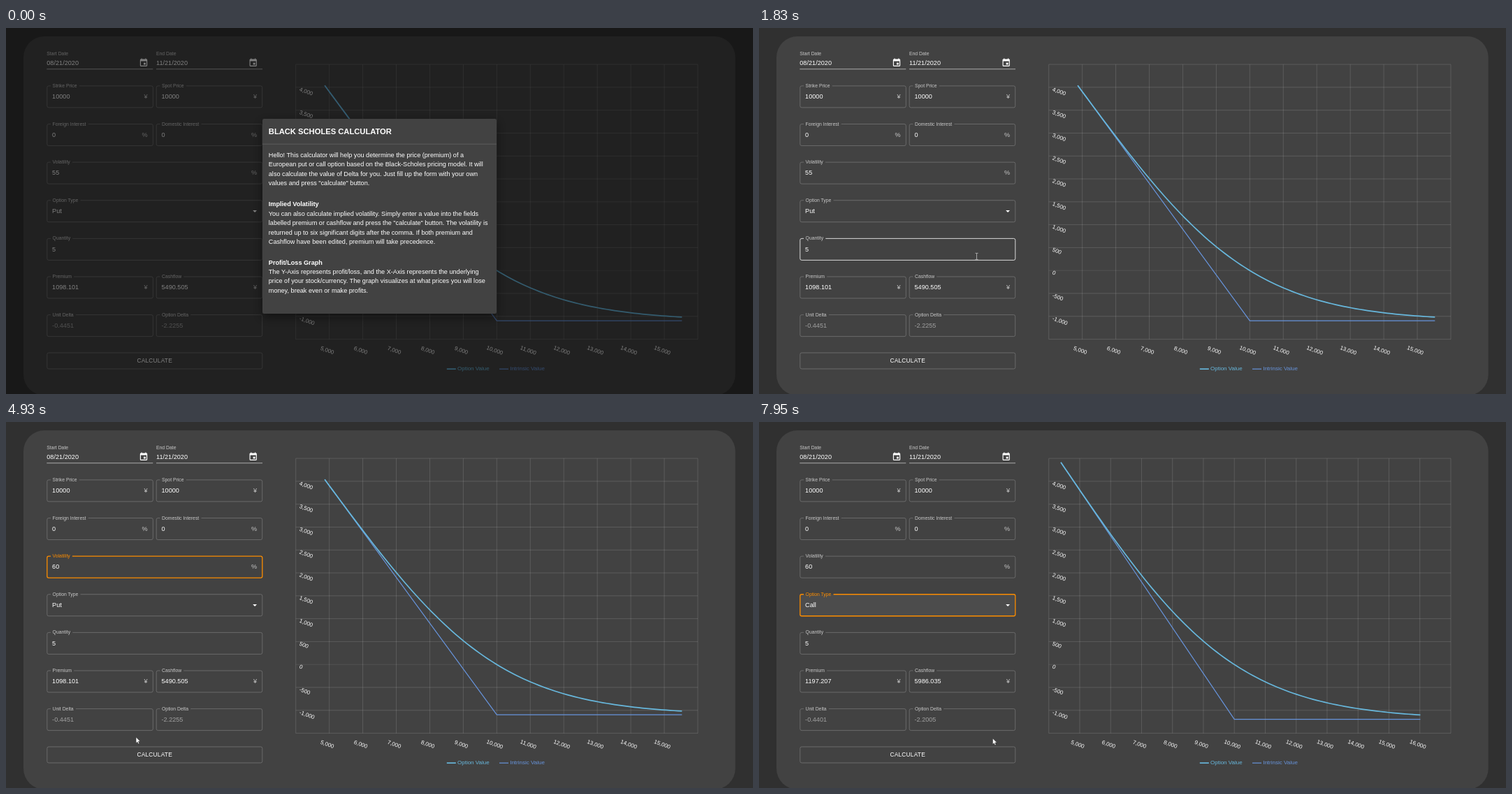
These frames come from a looping animation (1069x524 px, 8000 ms). An HTML page:

```html
<!DOCTYPE html>
<html lang="en">
<head>
<meta charset="utf-8">
<title>Option calculator</title>
<style>
  html, body { margin: 0; width: 100%; height: 100%; overflow: hidden; background: #303030; }
  svg { display: block; width: 1069px; height: 524px; }
  text { font-family: "Liberation Sans", Arial, sans-serif; font-size: 9.15px; fill: #fff; white-space: pre; }
  .label { font-size: 6.85px; fill: #c8c8c8; }
  .unit { fill: #c6c6c6; }
  .muted { fill: #a0a0a0; }
  .bold { font-weight: bold; }
  .tick, .legend { font-size: 8px; }
  .box { fill: none; stroke-width: .8; }
  .grid { stroke: #fff; stroke-opacity: .15; stroke-width: .9; }
  .curve { fill: none; vector-effect: non-scaling-stroke; stroke-linejoin: round; }
  .paper { fill: #424242; filter: drop-shadow(0 5px 7px rgba(0, 0, 0, .45)); }
</style>
</head>
<body>
<svg id="stage" viewBox="0 0 1069 524"></svg>
<script>
const LOOP = 8000;
const ORANGE = '#fb8c00', LINE = '#747474', BLUE = '#67b7dc', INDIGO = '#6794dc';
const stage = document.getElementById('stage');

function add(parent, tag, attrs = {}, content) {
  const node = document.createElementNS('http://www.w3.org/2000/svg', tag);
  set(node, attrs);
  if (content !== undefined) node.textContent = content;
  parent.appendChild(node);
  return node;
}
function set(node, attrs) {
  for (const key in attrs) node.setAttribute(key, attrs[key]);
}
const group = (parent = stage) => add(parent, 'g');
const text = (parent, x, y, content, cls = '', anchor = 'start') =>
  add(parent, 'text', { x, y, class: cls, 'text-anchor': anchor }, content);
const clamp = v => Math.max(0, Math.min(1, v));
const ramp = (t, from, to) => clamp((t - from) / (to - from));
const easeOut = p => 1 - (1 - p) ** 3;
const show = (node, on) => { node.style.display = on ? '' : 'none'; };

// ---- panel and form ----
add(stage, 'rect', { width: 1069, height: 524, fill: '#303030' });
add(stage, 'rect', { x: 25, y: 12, width: 1018.7, height: 514, rx: 30, fill: '#424242' });
const form = group();

function dateField(x, label, value) {
  text(form, x, 38.6, label, 'label');
  text(form, x, 52.6, value);
  add(form, 'path', { d: `M${x} 58.8h152`, stroke: '#c6c6c6', 'stroke-width': .8 });
  add(form, 'path', {
    transform: `translate(${x + 131.8} 42.8) scale(.575)`, fill: '#fff',
    d: 'M17 12h-5v5h5zM16 1v2H8V1H6v2H5a2 2 0 0 0-2 2v14a2 2 0 0 0 2 2h14a2 2 0 0 0 2-2V5a2 2 0 0 0-2-2h-1V1zM19 19H5V8h14z'
  });
}
dateField(58.3, 'Start Date', '08/21/2020');
dateField(215, 'End Date', '11/21/2020');

const fields = [];
function field(row, x, w, label, value, unit, muted) {
  const y = 82.9 + row * 54.62, h = 31, r = 2.3;
  const fill = add(form, 'rect', { x, y, width: w, height: h, rx: r, fill: '#fff', 'fill-opacity': 0 });
  const caption = text(form, x + 7.8, y + 2.1, label, 'label');
  const gapEnd = x + 11 + caption.getComputedTextLength();
  const box = add(form, 'path', {
    class: 'box', stroke: LINE,
    d: `M${gapEnd} ${y}H${x + w - r}q${r} 0 ${r} ${r}v${h - 2 * r}q0 ${r} ${-r} ${r}H${x + r}q${-r} 0 ${-r} ${-r}V${y + r}q0 ${-r} ${r} ${-r}H${x + 5.2}`
  });
  const content = text(form, x + 7.3, y + 18.3, value, muted ? 'muted' : '');
  if (unit) text(form, x + w - 7.6, y + 18.3, unit, 'unit', 'end');
  const made = {
    x, y, w, h, content, fill,
    draw(focus, hover) {
      set(box, { stroke: focus ? ORANGE : hover ? '#fff' : LINE });
      box.style.strokeWidth = focus ? 1.3 : .8;
      caption.style.fill = focus ? ORANGE : '';
    }
  };
  fields.push(made);
  return made;
}
const L = 58.8, R = 215.2, HALF = 151.5, FULL = 308;
field(0, L, HALF, 'Strike Price', '10000', '¥');
field(0, R, HALF, 'Spot Price', '10000', '¥');
field(1, L, HALF, 'Foreign Interest', '0', '%');
field(1, R, HALF, 'Domestic Interest', '0', '%');
const volatility = field(2, L, FULL, 'Volatility', '55', '%');
const kind = field(3, L, FULL, 'Option Type', 'Put');
field(4, L, FULL, 'Quantity', '5');
const premium = field(5, L, HALF, 'Premium', '', '¥');
const cashflow = field(5, R, HALF, 'Cashflow', '', '¥');
const unitDelta = field(6, L, HALF, 'Unit Delta', '', '', true);
const optionDelta = field(6, R, HALF, 'Option Delta', '', '', true);

const selection = add(form, 'rect', { x: 66, y: 202, width: 10.6, height: 10, fill: '#0f78d4' });
form.insertBefore(selection, volatility.content);
const caret = add(form, 'path', { fill: '#fff' });

const button = { x: L, y: 465, w: FULL, h: 23 };
const buttonBox = add(form, 'rect', {
  x: L, y: 465, width: FULL, height: 23, rx: 2.3, fill: '#fff', 'fill-opacity': 0, stroke: LINE, 'stroke-width': .8
});
set(text(form, 212.7, 479.4, 'CALCULATE', '', 'middle'), { style: 'font-size:8.4px;letter-spacing:.2px' });

// ---- chart ----
const ZERO = 347.2, TOP = 52.2, BOTTOM = 445.7, LEFT = 414.7, RIGHT = 990;
const STRIKE = 10000, YEARS = 92 / 365;

function normalCdf(x) {
  const z = Math.abs(x) / Math.SQRT2, k = 1 / (1 + .3275911 * z);
  const poly = k * (.254829592 + k * (-.284496736 + k * (1.421413741 + k * (-1.453152027 + k * 1.061405429))));
  const erf = 1 - poly * Math.exp(-z * z);
  return x < 0 ? (1 - erf) / 2 : (1 + erf) / 2;
}
function putPrice(spot, sigma) {
  const s = sigma * Math.sqrt(YEARS), d = Math.log(spot / STRIKE) / s + s / 2;
  return STRIKE * normalCdf(s - d) - spot * normalCdf(-d);
}
function chart(sigma, maxX, from, to) {
  const g = group();
  const cost = putPrice(STRIKE, sigma);
  const px = v => LEFT + (v - 4000) / (maxX - 4000) * (RIGHT - LEFT);
  const py = v => ZERO - v * .06558;
  const grid = d => add(g, 'path', { class: 'grid', d });
  const tick = (x, y, v, anchor) =>
    set(text(g, 0, 0, v.toLocaleString('en-US'), 'tick', anchor), { transform: `translate(${x} ${y}) rotate(20)` });

  for (let v = 4000; v <= maxX; v += 1000) {
    grid(`M${px(v)} ${TOP}V${BOTTOM}`);
    if (v > 4000 && v < maxX) tick(px(v) - 3.8, 463.9, v, 'middle');
  }
  for (let v = -1500; v <= 4500; v += 500) {
    const line = grid(`M${LEFT} ${py(v)}H${RIGHT}`);
    if (!v) line.style.strokeOpacity = .1;
    if (v > -1500 && v < 4500) tick(419.2, py(v) + 5, v, 'start');
  }
  const curves = group(g);
  const plot = (stroke, width, value, count) => {
    const points = [];
    for (let i = 0; i <= count; i++) {
      const v = from + (to - from) * i / count;
      points.push([v, value(v)]);
    }
    if (value === payoff) points.splice(1, 0, [STRIKE, -cost]);
    const d = 'M' + points.map(([a, b]) => `${px(a).toFixed(2)} ${py(b).toFixed(2)}`).join('L');
    add(curves, 'path', { class: 'curve', stroke, 'stroke-width': width, d });
  };
  const payoff = v => Math.max(0, STRIKE - v) - cost;
  plot(INDIGO, 1.2, payoff, 1);
  plot(BLUE, 1.7, v => putPrice(v, sigma) - cost, 90);

  const legend = (x, name, color, width) => {
    add(g, 'path', { d: `M${x} 488.2h13`, stroke: color, 'stroke-width': width });
    text(g, x + 15.2, 490.3, name, 'legend').style.fill = color;
  };
  legend(630.8, 'Option Value', BLUE, 1.7);
  legend(706, 'Intrinsic Value', INDIGO, 1.2);
  return {
    draw(opacity, scale) {
      set(g, { opacity });
      set(curves, { transform: `translate(0 ${ZERO * (1 - scale)}) scale(1 ${scale})` });
    }
  };
}
const chartBefore = chart(.55, 16000, 4864, 15527);
const chartAfter = chart(.6, 17000, 4391, 16015);

// ---- select menu ----
const menu = group();
add(menu, 'rect', { class: 'paper', x: 58.5, y: 226.5, width: 308.6, height: 51, rx: 2.3 });
const callRow = add(menu, 'rect', { x: 58.5, y: 231, width: 308.6, height: 21, fill: '#fff', 'fill-opacity': .08 });
add(menu, 'rect', { x: 58.5, y: 252, width: 308.6, height: 21, fill: '#fff', 'fill-opacity': .14 });
text(menu, 67, 244.6, 'Call');
text(menu, 67, 265.6, 'Put');

// ---- welcome dialog ----
const backdrop = add(stage, 'rect', { width: 1069, height: 524, fill: '#000' });
const dialog = group();
add(dialog, 'rect', { class: 'paper', x: 367, y: 130, width: 335, height: 279, rx: 2.3 });
add(dialog, 'path', { d: 'M367 166.2h335', stroke: '#616161', 'stroke-width': .8 });
text(dialog, 375.8, 151.9, 'BLACK SCHOLES CALCULATOR', 'bold').style.fontSize = '11.2px';
[
  [185, '', [
    'Hello! This calculator will help you determine the price (premium) of a',
    'European put or call option based on the Black-Scholes pricing model. It will',
    'also calculate the value of Delta for you. Just fill up the form with your own',
    'values and press "calculate" button.']],
  [255.3, 'Implied Volatility', [
    'You can also calculate implied volatility. Simply enter a value into the fields',
    'labelled premium or cashflow and press the "calculate" button. The volatility is',
    'returned up to six significant digits after the comma. If both premium and',
    'Cashflow have been edited, premium will take precedence.']],
  [338.6, 'Profit/Loss Graph', [
    'The Y-Axis represents profit/loss, and the X-Axis represents the underlying',
    'price of your stock/currency. The graph visualizes at what prices you will lose',
    'money, break even or make profits.']]
].forEach(([y, heading, lines]) => {
  if (heading) text(dialog, 375.8, y, heading, 'bold');
  lines.forEach((line, i) => text(dialog, 375.8, y + 13.4 * (i + (heading ? 1 : 0)), line));
});

// ---- mouse pointer ----
const pointer = group();
const shapes = {
  arrow: add(pointer, 'path', {
    d: 'M0 0V8.4L1.9 6.7L3.2 9.6L4.6 9L3.3 6.1H5.9Z', fill: '#fff', stroke: '#222', 'stroke-width': .4
  }),
  beam: add(pointer, 'path', {
    d: 'M-2 -4.5H-.5Q0 -4.5 0 -4Q0 -4.5 .5 -4.5H2M0 -4V4M-2 4.5H-.5Q0 4.5 0 4Q0 4.5 .5 4.5H2', fill: 'none', stroke: '#c0c0c0', 'stroke-width': .8
  }),
  hand: add(pointer, 'path', {
    d: 'M0 .8Q.9 -.6 1.7 .8V4L5.2 4.6Q6.3 5 6.2 6.4L5.5 10.8H1.2L-1.9 6.7Q-1.9 5.3 -.6 5.9L0 6.6Z',
    fill: '#fff', stroke: '#222', 'stroke-width': .4
  })
};
// time, x, y
const path = [
  [200, 859, 508], [510, 538, 458], [660, 533, 458], [820, 512, 458], [1430, 512, 458],
  [2210, 122, 203], [3900, 122, 203], [4000, 160, 264], [4700, 160, 264], [4930, 186, 451],
  [5120, 206, 497], [5330, 224, 478], [5560, 226, 477], [6040, 368.5, 305], [6330, 346, 268],
  [6550, 338.5, 267], [6750, 338, 266], [7180, 331, 241], [7410, 331, 241], [7950, 334.5, 453]
];
function pointerAt(t) {
  const i = path.findIndex(k => k[0] > t);
  if (i < 0) return path[path.length - 1].slice(1);
  if (!i) return path[0].slice(1);
  const [t0, x0, y0] = path[i - 1], [t1, x1, y1] = path[i];
  const p = (t - t0) / (t1 - t0);
  return [x0 + (x1 - x0) * p, y0 + (y1 - y0) * p];
}
const inside = (b, x, y) => x >= b.x && x <= b.x + b.w && y >= b.y && y <= b.y + b.h;

const dialogSteps = [[0, 1], [1060, .5], [1130, .06], [1210, .03], [1430, 0]];
const typed = [[0, '55'], [3920, '6'], [4550, '60']];
const at = (steps, t) => steps.filter(s => s[0] <= t).pop()[1];

function draw(t) {
  const [x, y] = pointerAt(t);
  const menuOpen = t >= 6510 && t < 7600;
  const picked = t >= 7400;
  const solved = t >= 5560;
  const focused = t >= 2290 && t < 5400 ? volatility : t >= 6480 ? kind : null;
  const over = t > 1210 && !menuOpen ? fields.find(f => inside(f, x, y)) : null;
  const overButton = t > 1210 && inside(button, x, y);

  fields.forEach(f => f.draw(f === focused, f === over));
  volatility.content.textContent = at(typed, t);
  kind.content.textContent = picked ? 'Call' : 'Put';
  premium.content.textContent = solved ? '1197.207' : '1098.101';
  cashflow.content.textContent = solved ? '5986.035' : '5490.505';
  unitDelta.content.textContent = solved ? '-0.4401' : '-0.4451';
  optionDelta.content.textContent = solved ? '-2.2005' : '-2.2255';
  set(kind.fill, { 'fill-opacity': picked ? .05 : 0 });
  set(caret, { d: t >= 6510 && !picked ? 'M353.2 263.6h5.8l-2.9 -2.9z' : 'M353.2 261h5.8l-2.9 2.9z' });
  show(selection, t >= 2650 && t < 3920);
  set(buttonBox, { 'fill-opacity': overButton ? .08 : 0 });

  chartBefore.draw(t < 5600 ? 1 : 0, 1);
  chartAfter.draw(ramp(t, 5660, 6370), easeOut(ramp(t, 5690, 6690)));

  show(menu, menuOpen);
  const grow = ramp(t, 6510, 6780);
  const sx = .75 + .25 * easeOut(grow), sy = .56 + .44 * easeOut(grow);
  set(menu, {
    opacity: picked ? 1 - ramp(t, 7400, 7580) : grow,
    transform: `translate(58.5 262) scale(${sx} ${sy}) translate(-58.5 -262)`
  });
  show(callRow, y < 252);

  const veil = at(dialogSteps, t);
  show(dialog, veil > 0);
  set(dialog, { opacity: veil });
  set(backdrop, { opacity: t < 1210 ? veil / 2 : 0 });

  const shape = over === kind || menuOpen || overButton ? 'hand' : over ? 'beam' : 'arrow';
  show(pointer, t >= 200);
  set(pointer, { transform: `translate(${x} ${y})` });
  for (const name in shapes) show(shapes[name], name === shape);
}
function tick() {
  draw(performance.now() % LOOP);
  requestAnimationFrame(tick);
}
tick();
</script>
</body>
</html>
```
